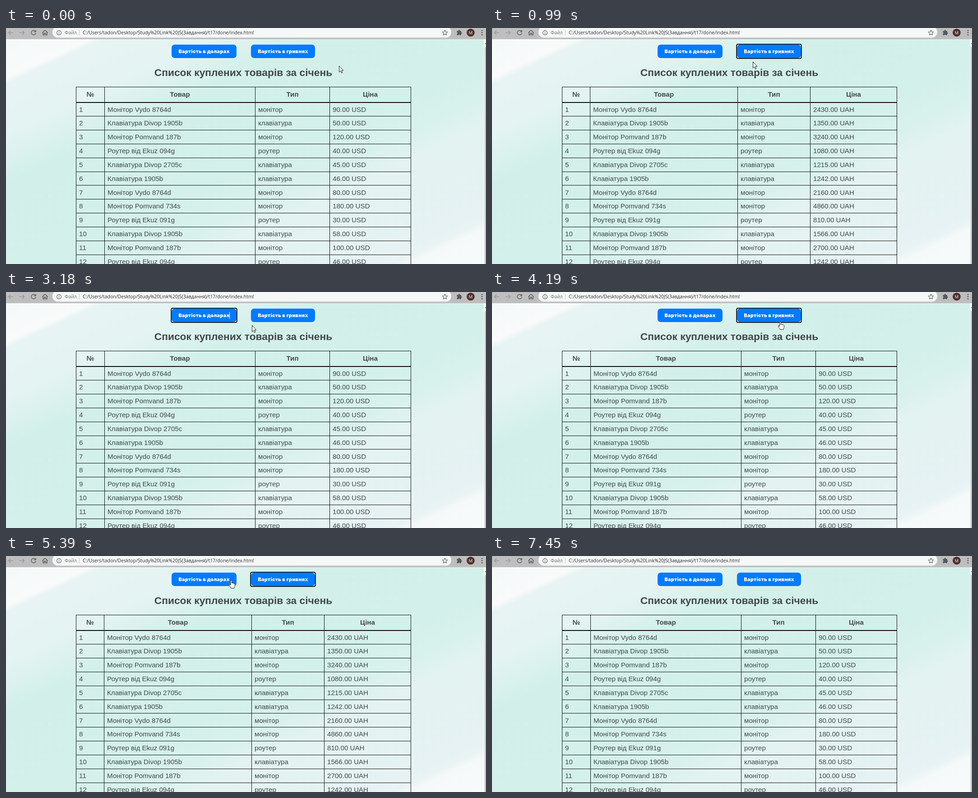
An HTML page for the animation above (7550 ms loop, 1064 by 526 pixels).

```html
<!DOCTYPE html>
<html lang="uk">
<head>
<meta charset="utf-8">
<title>Список товарів</title>
<style>
  html, body { margin: 0; width: 100%; height: 100%; overflow: hidden; }
  svg { display: block; width: 100%; height: 100%; }
  .page { font-family: "Liberation Sans", Arial, sans-serif; font-size: 15.15px; fill: #41474a; }
  .bold { font-weight: 700; }
  .mid { text-anchor: middle; }
  .btn { font: 900 10.9px Inter, sans-serif; letter-spacing: .3px; fill: #fff; text-anchor: middle; }
  .bar { font-family: "Open Sans", "Noto Sans", sans-serif; font-size: 10.5px; }
  .icon { fill: none; stroke: #5a5d60; stroke-width: 1.5; }
  .grid { fill: none; stroke: #0b0d0d; stroke-width: 1; }
</style>
</head>
<body>
<svg id="stage" viewBox="0 0 1064 526" preserveAspectRatio="none">
  <defs>
    <linearGradient id="bg" gradientUnits="userSpaceOnUse" x1="0" y1="0" x2="396.5" y2="843.6"></linearGradient>
  </defs>
  <rect width="1064" height="526" fill="url(#bg)"/>

  <g class="bar">
    <rect width="1064" height="25" fill="#bebebe"/>
    <rect x="103" y="-3" width="884" height="24.5" rx="12" fill="#f6f7f7"/>
    <path class="icon" style="stroke:#999" d="M16 10.5H5.5M10 6L5.5 10.5 10 15M30 10.5H40.500M36 6l4.500 4.500-4.500 4.500"/>
    <path class="icon" d="M65 7A5 5 0 1 0 66 11.500M66 4.500V8.500H62M80.500 10.500L86.500 5l6 5.500M82.200 9.500v6h3v-4h2.600v4h3v-6"/>
    <circle class="icon" style="stroke-width:1.1" cx="117.500" cy="10.500" r="4.900"/>
    <path class="icon" style="stroke-width:1.3" d="M117.500 10v3.200M117.500 7.400v1.300"/>
    <text x="130" y="14" fill="#6b6e71">Файл</text>
    <path d="M162.500 4V17" stroke="#c4c6c8"/>
    <text x="170" y="14" fill="#2b2e31">C:/Users/tadon/Desktop/Study%20Link%20JS(Завдання)/t17/done/index.html</text>
    <path class="icon" style="stroke-width:1.1" d="M973 5l1.600 3.600 3.900.400-2.900 2.600.800 3.900-3.400-2-3.400 2 .800-3.900-2.900-2.600 3.900-.400Z"/>
    <path fill="#55585b" d="M999.500 6.500h3.300a1.700 1.700 0 1 1 3.200 0h3v3.300a1.600 1.600 0 1 1 0 3.200v2.900h-3a1.700 1.700 0 0 0-3.200 0h-3.300v-3a1.700 1.700 0 0 0 0-3.300Z"/>
    <circle cx="1030" cy="10.300" r="8.800" fill="#4b302b"/>
    <text class="mid" x="1030" y="13.700" font-size="9.500" fill="#fff">M</text>
    <g fill="#55585b"><circle cx="1055" cy="5.800" r="1.400"/><circle cx="1055" cy="10.500" r="1.400"/><circle cx="1055" cy="15.200" r="1.400"/></g>
  </g>

  <rect x="1059" y="25" width="5" height="501" fill="#f4f6f6"/>
  <rect x="1061" y="43" width="3" height="483" fill="#c3c5c5"/>
  <path d="M1061.500 36L1064 33v3Z" fill="#555"/>

  <g id="buttons"></g>
  <path id="caret" d="M495.500 44.500V60" stroke="#fff"/>
  <g class="page">
    <text class="bold mid" x="526" y="107" font-size="22.800">Список куплених товарів за січень</text>
    <g id="tables"></g>
  </g>
  <g id="cursor" stroke="#16181a" fill="#fff" stroke-linejoin="round">
    <path id="arrow" d="M.500.500V14.300L3.600 11.400 5.700 16.300 7.900 15.300 5.800 10.600H9.800Z"/>
    <path id="hand" d="M-1.500 11V1.700C-1.500-.1 1.300-.1 1.300 1.700V6.600C1.300 5.200 3.800 5.400 3.800 7 4 5.800 6.200 6.100 6.200 7.700 6.600 6.800 8.400 7.100 8.400 8.700V12.200C8.400 14.300 7 15 7 17.600H-.400C-.600 15.200-3.200 13.400-4.500 10.800-5.100 9.300-3.400 8.600-2.500 9.700Z"/>
  </g>
</svg>
<script>
const LOOP = 7550;
const $ = id => document.getElementById(id);

// Diagonal background: distance across the bands, colour
const bands = [[0, "#f3f8f8"], [112, "#f8fbfa"], [126, "#e7f4f3"], [235, "#e4f4f2"],
  [310, "#d8f1ec"], [345, "#d2f0e9"], [560, "#d3f0ea"], [650, "#d8f1ec"], [715, "#e3f3f1"],
  [900, "#e6f2f3"], [925, "#e8f3f4"], [948, "#f5f9f9"], [1030, "#f8fbfb"]];
$("bg").innerHTML = bands.map(([s, c]) => `<stop offset="${s / 1030}" stop-color="${c}"/>`).join("");

const buttons = [
  { id: "USD", x: 367, w: 144, label: "Вартість в доларах" },
  { id: "UAH", x: 543, w: 142, label: "Вартість в гривнях" }
];
$("buttons").innerHTML = buttons.map(({ id, x, w, label }) => `
  <g id="ring${id}" fill="none">
    <rect x="${x}" y="37" width="${w}" height="30" rx="2" stroke="#fff"/>
    <rect x="${x - .8}" y="36.200" width="${w + 1.600}" height="31.600" rx="3" stroke="#101010" stroke-width="1.900"/>
  </g>
  <rect x="${x}" y="37" width="${w}" height="30" rx="7" fill="#007bff"/>
  <text class="btn" x="${x + w / 2}" y="56">${label}</text>`).join("");

const goods = [
  ["Монітор Vydo 8764d", 90], ["Клавіатура Divop 1905b", 50], ["Монітор Pomvand 187b", 120],
  ["Роутер від Ekuz 094g", 40], ["Клавіатура Divop 2705c", 45], ["Клавіатура 1905b", 46],
  ["Монітор Vydo 8764d", 80], ["Монітор Pomvand 734s", 180], ["Роутер від Ekuz 091g", 30],
  ["Клавіатура Divop 1905b", 58], ["Монітор Pomvand 187b", 100], ["Роутер від Ekuz 094g", 46]
];
const heads = ["№", "Товар", "Тип", "Ціна"];

function table(unit, rate, cols) {
  const rowTop = i => 166 + 30.82 * i;
  let lines = "M155 131.500H898";
  for (const x of cols) lines += `M${x} 131V526`;
  let text = heads.map((h, c) =>
    `<text class="bold mid" x="${(cols[c] + cols[c + 1]) / 2}" y="153.200">${h}</text>`).join("");
  goods.forEach(([name, price], i) => {
    const kind = name.split(" ")[0].toLowerCase();
    const cells = [i + 1, name, kind, (price * rate).toFixed(2) + " " + unit];
    const y = rowTop(i) + 20.6;
    if (i) lines += `M155 ${Math.floor(rowTop(i)) + .5}H898`;
    text += cells.map((s, c) => `<text x="${cols[c] + 6.5}" y="${y}">${s}</text>`).join("");
  });
  return `<g id="table${unit}"><path class="grid" d="${lines}"/>
    <path class="grid" style="stroke-width:2" d="M155 166H898"/>${text}</g>`;
}
$("tables").innerHTML =
  table("USD", 1, [155.5, 218.5, 552.5, 717.5, 897.5]) +
  table("UAH", 27, [155.5, 217.5, 544.5, 705.5, 897.5]);

// Pointer moves: first step, last step, position at each step
const moves = [
  [130, 550, [[690, 68], [650, 52], [637, 46], [637, 46]]],
  [840, 1850, [[620, 62], [578, 75], [555, 77], [540, 76], [525, 72], [511, 66], [503, 62], [500, 60]]],
  [2600, 3610, [[500, 60], [500, 60], [506, 63], [520, 70], [545, 74], [575, 73], [605, 69], [625, 66]]],
  [3760, 4350, [[634, 66], [638, 66], [639, 66], [639, 66], [639, 66]]],
  [4960, 5700, [[618, 66], [580, 66], [535, 61], [499, 54], [486, 53], [480, 53]]],
  [6000, 7040, [[480, 53], [480, 53], [520, 75], [620, 150], [760, 270], [900, 400], [1037, 500], null]]
];
const focus = [[0, ""], [410, "UAH"], [2600, "USD"], [4190, "UAH"], [6000, "USD"], [7450, ""]];
const currency = [[0, "USD"], [550, "UAH"], [2745, "USD"], [4345, "UAH"], [6150, "USD"]];

const current = (track, t) => track.filter(([at]) => t >= at).pop()[1];

function pointer(t) {
  const move = moves.filter(([from]) => t >= from).pop();
  if (!move) return [738, 84];
  const [from, to, path] = move;
  const last = path.length - 1;
  return path[Math.min(last, Math.floor((t - from + 16) / ((to - from) / last)))];
}

const show = (id, on) => $(id).setAttribute("display", on ? "inline" : "none");

function draw(t) {
  const active = current(focus, t), unit = current(currency, t), pos = pointer(t);
  for (const { id } of buttons) {
    show("ring" + id, id === active);
    show("table" + id, id === unit);
  }
  show("caret", active === "USD");
  show("cursor", pos);
  if (!pos) return;
  const [x, y] = pos;
  const over = y >= 37 && y <= 67 && buttons.some(b => x >= b.x && x <= b.x + b.w);
  show("hand", over);
  show("arrow", !over);
  $("cursor").setAttribute("transform", `translate(${x} ${y})`);
}

const start = performance.now();
function tick() {
  draw((performance.now() - start) % LOOP);
  requestAnimationFrame(tick);
}
tick();
</script>
</body>
</html>
```
